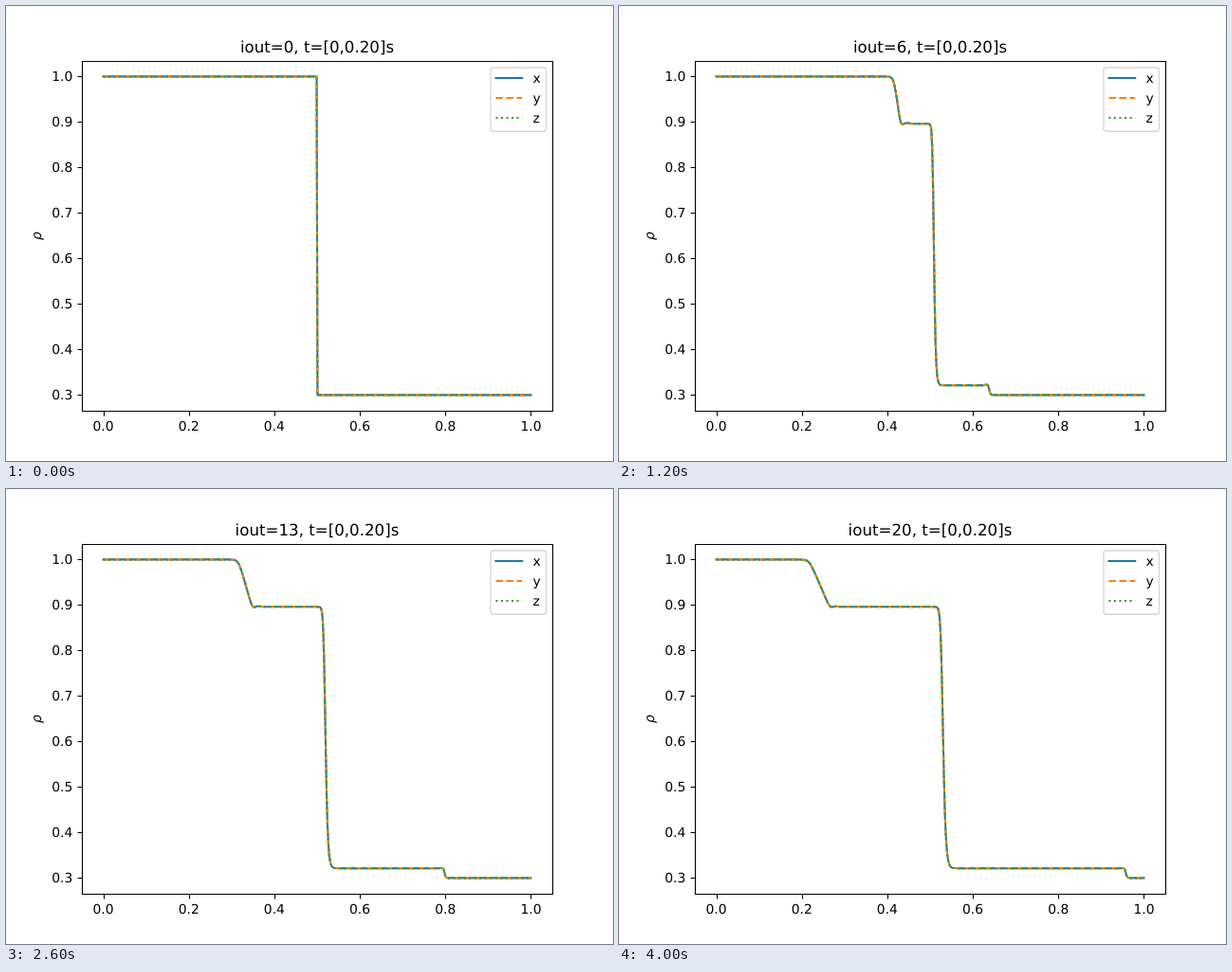
Animation, 640 px wide and 480 px high, one loop 4.2 s. Source, as an HTML page:

```html
<!DOCTYPE html>
<html lang="en">
<head>
<meta charset="utf-8">
<title>Density profile</title>
<style>
html, body { margin: 0; width: 100%; height: 100%; overflow: hidden; background: #fff; }
svg { display: block; font: 13.889px "DejaVu Sans", sans-serif; text-rendering: geometricPrecision; }
path { fill: none; stroke-width: 2.083; stroke-linejoin: round; }
.x { stroke: #1f77b4; stroke-linecap: square; }
.y { stroke: #ff7f0e; stroke-dasharray: 7.708 3.333; }
.z { stroke: #2ca02c; stroke-dasharray: 2.083 3.4375; }
.axis { stroke: #000; stroke-width: 1.111; stroke-linejoin: miter; }
</style>
</head>
<body>
<svg id="plot" width="640" height="480" viewBox="0 0 640 480"></svg>
<script>
const STEP = 200, COUNT = 21, CELLS = 512;
const px = x => 102.545 + 450.909 * x;
const py = v => 74.4 + 480 * (1 - v);
const text = (x, y, s, anchor = 'start', more = '') =>
  `<text x="${x}" y="${y}" text-anchor="${anchor}" ${more}>${s}</text>`;

function build() {
  let ticks = 'M80.5 58.5H576.5V427.5H80.5Z', out = '';
  for (let i = 0; i <= 5; i++) {
    const x = px(i / 5);
    ticks += `M${Math.round(x) + .5} 427.5v5`;
    out += text(x, 448, (i / 5).toFixed(1), 'middle');
  }
  for (let i = 3; i <= 10; i++) {
    const y = Math.round(py(i / 10));
    ticks += `M80.5 ${y + .5}h-5`;
    out += text(70.3, y + 5, (i / 10).toFixed(1), 'end');
  }
  out += text(0, 0, 'ρ', 'middle', 'font-style="italic" transform="translate(37 242.5) rotate(-90)"');
  out += text(328, 49, '', 'middle', 'id="title" font-size="16.667"');
  for (const c of 'xyz') out += `<path class="${c} curve"/>`;
  out += `<path class="axis" d="${ticks}"/>`;
  out += '<rect x="511" y="65" width="58.5" height="67.3" rx="2.8" fill="#fff" fill-opacity=".8" stroke="#ccc" stroke-opacity=".8" stroke-width="1.389"/>';
  [...'xyz'].forEach((c, i) => {
    const y = 76 + 21 * i;
    out += `<path class="${c}" d="M516.4 ${y}h27.8"/>` + text(555.4, y + 5, c);
  });
  plot.innerHTML = out;
}

const softplus = s => s > 30 ? s : Math.log1p(Math.exp(s));
const drop = s => 1 - (1 + Math.exp(-s)) ** -2;   // smeared jump, 1 to 0
const bump = s => Math.exp(-s * s);

// Density in a shock tube: rarefaction, contact and shock leaving x = 0.5
function profile(n) {
  if (!n) return x => x < .5 ? 1 : .3;
  const t = n / 100, grow = Math.cbrt(n / 20), ripple = .005 / Math.sqrt(n);
  const head = px(.5 - 1.414 * t), tail = px(.5 - 1.186 * t) + .8;
  const contact = px(.5 + .152 * t), shock = px(.5 + 2.28 * t) + .8;
  const wh = 2 * grow, wt = .9 * grow, wc = 1.63 * grow;
  return x => {
    const p = px(x);
    const fan = (wh * softplus((p - head) / wh) - wt * softplus((p - tail) / wt)) / (tail - head);
    const wave = ripple * (bump((p - tail - 7) / 3) - bump((p - tail - 2) / 1.5));
    const left = 1 - .104 * fan + wave;
    const right = .3 + .0214 * drop((p - shock) / .7 + .88) + .009 / n * bump((p - shock + 3) / 2);
    return right + (left - right) * drop((p - contact) / wc + .88);
  };
}

let shown = -1;
function draw(now) {
  const n = Math.floor(now / STEP) % COUNT;
  if (n !== shown) {
    shown = n;
    const rho = profile(n), points = [];
    for (let i = 0; i < CELLS; i++) {
      const x = i / (CELLS - 1);
      points.push(px(x).toFixed(2) + ' ' + py(rho(x)).toFixed(2));
    }
    const d = 'M' + points.join('L');
    document.querySelectorAll('.curve').forEach(p => p.setAttribute('d', d));
    document.getElementById('title').textContent = `iout=${n}, t=[0,0.20]s`;
  }
}

const plot = document.getElementById('plot');
build();
const start = performance.now();
function tick() {
  draw(performance.now() - start);
  requestAnimationFrame(tick);
}
tick();
</script>
</body>
</html>
```
